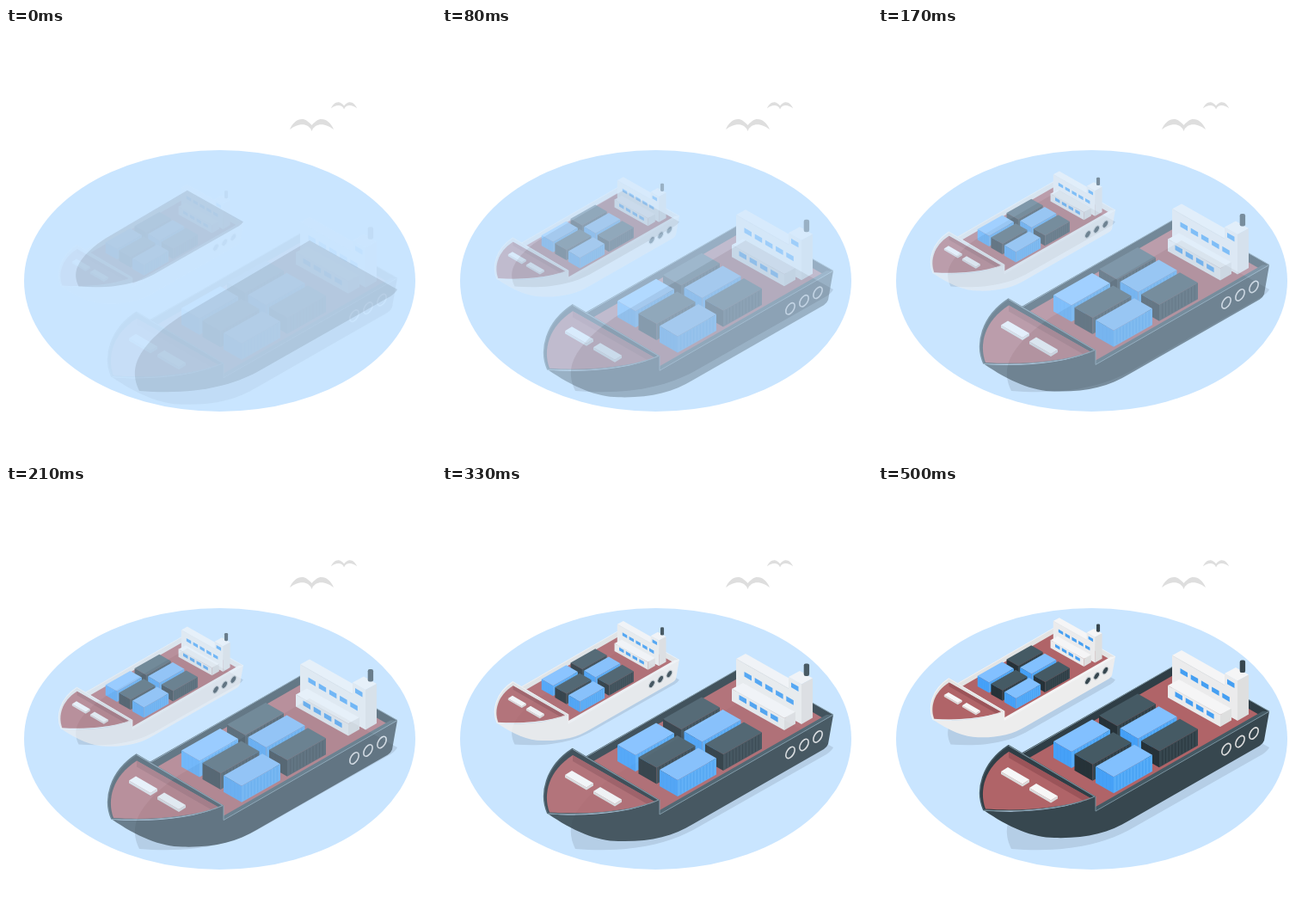
Animation, 500 px wide and 500 px high, one loop 540 ms. Source, as an HTML page:

```html
<!DOCTYPE html>
<html lang="en">
<head>
<meta charset="utf-8">
<title>Cargo ships</title>
<style>
html, body { margin: 0; width: 100%; height: 100%; overflow: hidden; background: #fff; }
svg { display: block; width: 100%; height: 100%; }
</style>
</head>
<body>
<svg id="stage" viewBox="0 0 500 500"></svg>
<script>
const LOOP = 540, FPS = 24, STEPS = 13, RISE = 30;
const SMALL = 'translate(147 261.5) scale(.638) translate(-253 -361)';

const poly = (pts, fill) => `<polygon points="${pts}" fill="${fill}"/>`;
const path = (d, fill) => `<path d="${d}" fill="${fill}"/>`;
const line = (d, stroke, w = 1) =>
  `<path d="${d}" fill="none" stroke="${stroke}" stroke-width="${w}" stroke-linejoin="round"/>`;

const BLUE = { top: '#82c0ff', left: '#46a1f8', right: '#56acf9', rib: '#429df2' };
const DARK = { top: '#455a64', left: '#263238', right: '#37474f', rib: '#2a373e' };

// Box seen from its left corner: short edge (21,12), long edge (45,-25.5), height 19
function container(x, y, c) {
  let ribs = '', ends = '';
  for (let k = 1; k < 12; k++) ribs += `M${x + 21 + k * 45 / 12} ${y + 13 - k * 25.5 / 12}v17`;
  for (let k = 1; k < 5; k++) ends += `M${x + k * 4.2} ${y + 1 + k * 2.4}v17`;
  return poly(`${x},${y} ${x + 45},${y - 25.5} ${x + 66},${y - 13.5} ${x + 21},${y + 12}`, c.top) +
    poly(`${x},${y} ${x + 21},${y + 12} ${x + 21},${y + 31} ${x},${y + 19}`, c.left) +
    poly(`${x + 21},${y + 12} ${x + 66},${y - 13.5} ${x + 66},${y + 5.5} ${x + 21},${y + 31}`, c.right) +
    line(ribs, c.rib, .9) + line(ends, c.rib, .5);
}

function cargo() {
  let out = '';
  for (let j = 1; j >= 0; j--)
    for (let i = 0; i < 3; i++)
      out += container(204 + i * 24.5 + j * 53, 297 + i * 14.6 - j * 30, (i + j) % 2 ? DARK : BLUE);
  return out;
}

const pane = (x, y) => poly(`${x},${y} ${x + 8.5},${y + 4.9} ${x + 8.5},${y + 10.5} ${x},${y + 5.6}`, '#459ff2');
const panes = (x, y, n) => Array.from({ length: n }, (_, i) => pane(x + i * 12.2, y + i * 7.1)).join('');

function bridge() {
  const top = '#f6f6f6', face = '#ececec', side = '#dfdfdf';
  return poly('342,197 353,191 429,234 418,240', top) +
    poly('342,197 418,240 418,272 342,240', face) +
    poly('403,218 416,211 431,219.5 418,226.5', top) +
    poly('403,218 418,226.5 418,273 403,264', face) +
    poly('418,226.5 431,219.5 431,265.5 418,273', side) +
    panes(351.5, 212, 5) + pane(406, 224.5) +
    poly('337,232 350,225 411,259 398,266', top) +
    poly('337,232 398,266 398,280 337,246', face) +
    poly('398,266 411,259 411,272.5 398,280', side) +
    line('M342 197L403 231.5M337 232L398 266L411 259', '#dedede', .6) +
    panes(345.5, 239, 4) +
    `<rect x="420.7" y="202.5" width="6.4" height="14.5" rx="2.2" fill="#37474f"/>`;
}

function hatch(x, y) {
  return poly(`${x},${y} ${x + 25},${y + 14.5} ${x + 33},${y + 9.5} ${x + 33},${y + 12.5} ${x + 25},${y + 17.5} ${x},${y + 3}`, '#dcdcdc') +
    poly(`${x},${y} ${x + 8},${y - 5} ${x + 33},${y + 9.5} ${x + 25},${y + 14.5}`, '#f8f8f8');
}

function ship(c) {
  const deck = '#b06468', shade = '#9b5459';
  const front = 'C218 376 165 379 123 377';
  const ports = [[405, 306], [421, 297], [437, 287.5]].map(([x, y]) =>
    `<ellipse cx="${x}" cy="${y}" rx="4.1" ry="7.4" transform="rotate(31 ${x} ${y})"
      fill="${c.port}" stroke="${c.ring}" stroke-width="1.6"/>`).join('');
  return poly('166,311 353,204 455,262 253,378', c.inner) +
    poly('176,316 353,214.5 445,267 253,375', deck) +
    line('M168 311L353 204L455 262', c.edge) +
    cargo() + bridge() +
    poly('253,378 455,262 447,262 253,373', c.rim) +
    path(`M253 378L455 262L449 296Q448 299 444 302L292 389C268 404 240 410 205 409
      C180 409 152 397 123 377C160 381 215 378 253 361Z`, c.hull) +
    line('M253 361V378L455 262', c.edge) +
    path(`M152 301L253 361${front}C113 355 120 322 152 301Z`, c.inner) +
    path('M152 309L247 363C213 375.5 163 378 125 375.5C117 354 124 327 152 309Z', deck) +
    poly('152,309 247,363 239,366 152,316', shade) +
    line(`M152 302L252 361${front}`, c.edge, 1.1) +
    line('M123 377C113 355 120 322 152 301.5', c.rim, 1.6) +
    hatch(143, 332) + hatch(176, 351) + ports;
}

const shadow = path(`M353 247L455 304Q453 308 447 312L292 400C262 416 220 427 155 422
  C149 410 148 398 153 386C161 367 185 346 205 334Z`, '#b5cee6');

const bird = path(`M330 118C334 108 343 103 350 108Q354 111 355.5 113Q357 111 361 108
  C368 103 377 108 381 118C375 113 366 110 360 114Q357 116 355.5 120
  Q354 116 351 114C345 110 336 113 330 118Z`, '#dedede');

const steel = { hull: '#37474f', inner: '#2f3e46', rim: '#455a64', edge: '#78909c', port: '#37474f', ring: '#e0e0e0' };
const white = { hull: '#eeeeee', inner: '#e4e4e4', rim: '#f5f5f5', edge: '#fafafa', port: '#37474f', ring: '#c9ced1' };

const stage = document.getElementById('stage');
stage.innerHTML = `
  <ellipse cx="248.5" cy="294" rx="227.5" ry="152" fill="#c9e5ff"/>
  ${bird}
  <g transform="translate(378 86) scale(.59) translate(-330 -105.5)">${bird}</g>
  <g transform="${SMALL}">${shadow}</g>
  ${shadow}
  <g class="ship"><g transform="${SMALL}">${ship(white)}</g></g>
  <g class="ship">${ship(steel)}</g>`;
const ships = stage.querySelectorAll('.ship');

// Start of each step, on a 10 ms clock
const stepStart = i => Math.round(i * 100 / FPS) * 10;

function draw(ms) {
  const t = ms % LOOP;
  let i = STEPS - 1;
  while (i > 0 && stepStart(i) > t) i--;
  const left = (1 - (i + .3) / STEPS) ** 2;
  for (const s of ships) {
    s.setAttribute('transform', `translate(0 ${RISE * left})`);
    s.setAttribute('opacity', 1 - left);
  }
}

let start;
function tick(now) {
  start ??= now;
  draw(now - start);
  requestAnimationFrame(tick);
}
draw(0);
requestAnimationFrame(tick);
</script>
</body>
</html>
```
